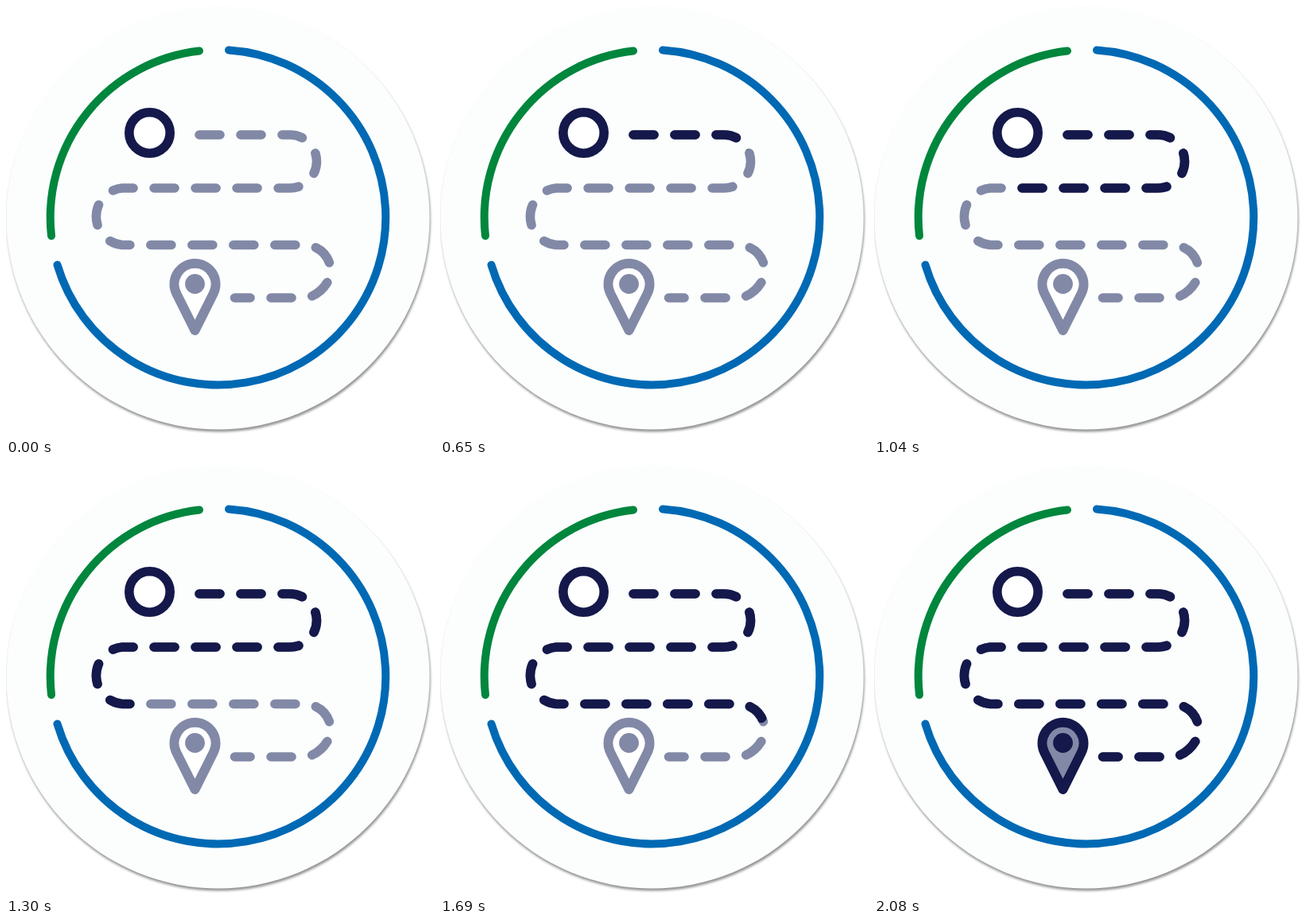
An HTML page that plays this animation: 538 px wide and 542 px high, repeating every 2860 ms.

```html
<!DOCTYPE html>
<html lang="en">
<head>
<meta charset="utf-8">
<title>Route</title>
<style>
  html, body { margin: 0; width: 100%; height: 100%; overflow: hidden; background: #fff; }
  svg { display: block; width: 538px; height: 542px; }
  .line { fill: none; stroke-linecap: round; stroke-linejoin: round; }
  .disc { fill: #fbfefd; filter: drop-shadow(1.5px 3px 1.8px rgba(0, 0, 0, .42)); }
  .arc { stroke-width: 10; }
  .route { stroke-width: 11.6; stroke-dasharray: 26 26; }
  .light { stroke: #8289a7; }
  .dark { stroke: #14184a; }
  .start { fill: #fff; stroke: #14184a; stroke-width: 11.6; }
  .pin { --ink: #8289a7; --hole: #fff; }
  .pin.on { --ink: #14184a; --hole: #8289a7; }
  .pin path { fill: var(--hole); stroke: var(--ink); stroke-width: 12; stroke-linejoin: round; }
  .pin circle { fill: var(--ink); }
</style>
</head>
<body>
<svg viewBox="0 0 538 542">
  <defs>
    <path id="track" d="M243 162 H357 A33.5 33.5 0 0 1 357 229 H146
      A35.9 35.9 0 0 0 146 300.5 H375 A33.25 33.25 0 0 1 408.25 333.75
      C408.25 348.7 390 367 375 367 H287.5"/>
    <mask id="reveal" maskUnits="userSpaceOnUse" x="0" y="0" width="538" height="542">
      <use id="wipe" class="line" href="#track" stroke="#fff" stroke-width="14"/>
    </mask>
  </defs>
  <circle class="disc" cx="266.5" cy="266.5" r="266"/>
  <path class="line arc" stroke="#0069b4" d="M280 55.5 A210.7 210.7 0 1 1 64.5 325.5"/>
  <path class="line arc" stroke="#00863d" d="M57 289 A210.7 210.7 0 0 1 243 56.5"/>
  <circle class="start" cx="180.5" cy="159.5" r="25.7"/>
  <use class="line route light" href="#track"/>
  <g id="done" mask="url(#reveal)"><use class="line route dark" href="#track"/></g>
  <g id="pin" class="pin">
    <path d="M237.5 408 L214.3 361.6 A26 26 0 1 1 260.7 361.6 Z"/>
    <circle cx="237.5" cy="349.5" r="12.4"/>
  </g>
</svg>
<script>
  const LOOP = 2860, STEP = 130, DELAY = 520;
  const FIRST = 62, ADVANCE = 82, PIN_STEP = 12;
  const get = id => document.getElementById(id);
  const wipe = get('wipe'), done = get('done'), pin = get('pin');
  const begin = performance.now();

  function draw(t) {
    const step = Math.floor((t - DELAY) / STEP);
    const length = FIRST + ADVANCE * Math.max(0, Math.min(step, PIN_STEP));
    done.style.display = step < 0 ? 'none' : '';
    wipe.style.strokeDasharray = length + ' 3000';
    pin.classList.toggle('on', step >= PIN_STEP);
  }

  function tick() {
    draw((performance.now() - begin) % LOOP);
    requestAnimationFrame(tick);
  }
  tick();
</script>
</body>
</html>
```
